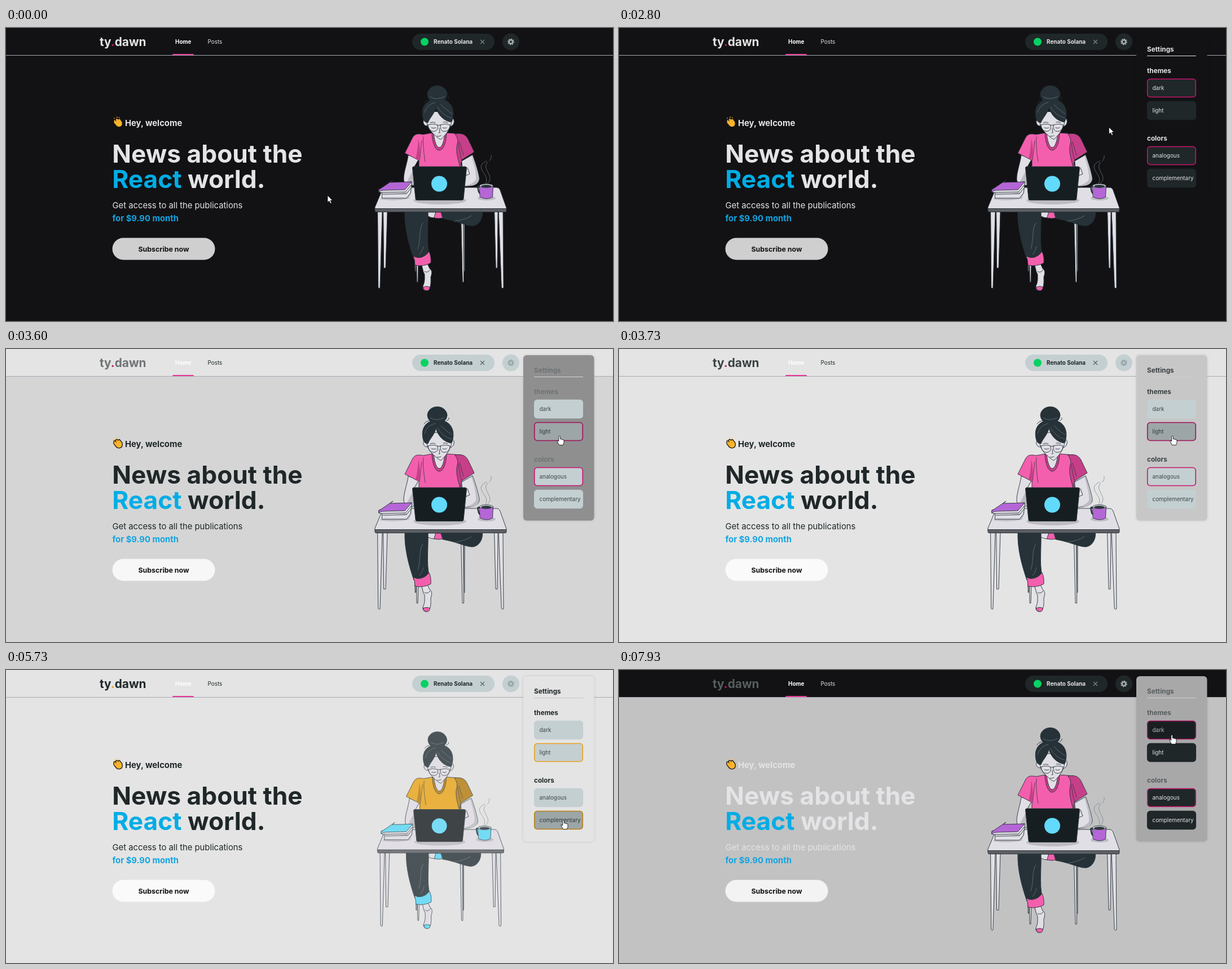
An HTML page for the animation above (8000 ms loop, 1076 px wide and 520 px high).

```html
<!DOCTYPE html>
<html lang="en">
<head>
<meta charset="utf-8">
<title>News</title>
<style>
html, body { margin: 0; width: 100%; height: 100%; overflow: hidden; background: #121214; }
svg { display: block; font-family: Inter, sans-serif;
  --base: #121214; --soft: #1f2729; --text: #e4e4e6; --btnText: #e4e4e4; --icon: #a2a9ab; --cross: #7d8689;
  --accent: #c8146e; --shirt: #f35fad; --shade: #c63f89; --cuff: #f35fad; --item: #b566d6; }
svg.light { --base: #e4e4e4; --soft: #c4cfd1; --text: #1f2729; --btnText: #3d474a; --icon: #97a7aa; --cross: #56656a; }
svg.alt { --accent: #e9a01c; --shirt: #eba519; --shade: #b67c0f; --cuff: #5ad9f9; --item: #5ad9f9; }
.base { fill: var(--base); } .soft { fill: var(--soft); } .text { fill: var(--text); } .ink { fill: var(--ink); }
.b { font-weight: 700; }
.s16 { font-size: 9.92px; } .s19 { font-size: 11.75px; } .s20 { font-size: 12.4px; } .s24 { font-size: 14.8px; } .h1 { font-size: 44.25px; }
.skin { fill: #e1dfe6; } .shirt { fill: var(--shirt); } .shade { fill: var(--shade); } .cuff { fill: var(--cuff); } .item { fill: var(--item); }
.hair { fill: #263238; } .shadow { fill: #bdbbc3; stroke: none; }
.line { fill: none; }
#figure { stroke: #263238; stroke-width: .9; stroke-linejoin: round; stroke-linecap: round; }
.pale { fill: none; stroke: #6f7d84; stroke-width: .7; }
</style>
</head>
<body>
<svg id="stage" width="1076" height="520" viewBox="0 0 1076 520">
  <rect width="1076" height="520" fill="var(--bg)"/>
  <rect class="base" width="1076" height="48"/>
  <rect y="48" width="1076" height="1" fill="#a8a8b3"/>

  <text class="b ink" x="166" y="32" font-size="20.8">ty<tspan fill="var(--accent)">.</tspan>dawn</text>
  <text class="b s16" x="300" y="28" fill="#fff">Home</text>
  <path d="M295 48v-.5q0-1.500 1.500-1.500h35q1.500 0 1.500 1.500v.5z" fill="#e8399a"/>
  <text class="text s16" x="357.500" y="28">Posts</text>

  <rect class="soft" x="720" y="10" width="146" height="29" rx="14.500"/>
  <circle cx="742" cy="24.500" r="7" fill="#04d361"/>
  <text class="text b s16" x="758" y="28.300">Renato Solana</text>
  <path d="M841 21l7 7m0-7l-7 7" stroke="var(--cross)" stroke-width="1.200"/>
  <g id="gear">
    <circle class="soft" cx="895" cy="24.500" r="15"/>
    <g fill="none" stroke="var(--icon)">
      <circle cx="895" cy="24.500" r="3.300" stroke-width="2.800"/>
      <circle cx="895" cy="24.500" r="5.100" stroke-width="1.800" pathLength="16" stroke-dasharray="1"/>
    </g>
  </g>

  <g transform="translate(198 168) scale(1.12) translate(-198 -168.500)" fill="#ffb72b" stroke="#1d1a18" stroke-width="1.200">
    <path d="M192 166q-1-3 2-2l1 1q-1-4 2-3l2 1q1-2 3 0l3 4q1 5-1 7-4 3-8 0l-4-5q-1-2 0-3z"/>
    <path d="M193 169l5 5m-3-7l4 4m-1-7l3 4" stroke="#d98a16" stroke-width=".6"/>
    <path d="M193 162l-1-1m5 0l0-2m3 2l1-1" stroke="#ffb72b"/>
  </g>
  <text class="text b s24" x="211" y="173.500">Hey, welcome</text>
  <text class="text b h1" x="188.200" y="239">News about the</text>
  <text class="text b h1" x="188.200" y="283.600"><tspan fill="#00ade5">React</tspan> world.</text>
  <text class="text s24" x="188.500" y="320">Get access to all the publications</text>
  <text class="b s24" x="188.500" y="342.500" fill="#12a4e1">for $9.90 month</text>
  <rect x="188.500" y="372.500" width="182" height="39" rx="19.500" fill="var(--cta)"/>
  <text class="b s20" x="279.500" y="396.800" text-anchor="middle" fill="#121214">Subscribe now</text>

  <g id="figure">
    <!-- chair and table legs -->
    <g class="skin">
      <path d="M725 410h2l-.5 22h-1zM728 415h3l-1 36h-1.500zM807 340h5l-.5 111h-2zM811 345h2v87h-1z"/>
      <path d="M669 326h7l-3 100h-3zM866 326h6l-1 100h-2.500z"/>
      <path d="M659 326h8l-4 135q-1.500 2-3 0zM873.500 326h7.500l1 135q-2 2-3.500 0z"/>
    </g>
    <!-- legs -->
    <path class="skin" d="M748 327h14l-2 10q-7 0-12-3z"/>
    <path class="cuff" d="M762 327h14l-1 10q-8 2-16 0z"/>
    <path class="hair" d="M771 326h73.500c1 11-5 23-16 25-12 1-26-8-54-13z"/>
    <path class="hair" d="M707 326c-1 28 7 58 16 84l27-8c-5-24-1-50-2-76z"/>
    <path class="pale" d="M739 346c-8 10-3 30-9 46m10-4c-2 7-4 11-7 14M795 343q20-3 30-10"/>
    <path class="skin" d="M737 420l10-2 4 9c5 3 4 9 2 15 0 9 1 18-5 23-5 3-10-1-9-7 4-8 3-14 3-21l-2-4z"/>
    <path class="line" d="M742 432q5 4 10-3"/>
    <path class="cuff" d="M739.500 460q6-3 12 0-1 7-6 6-5 0-6-6z"/>
    <path class="cuff" d="M722 405q15 8 28-8 4 8 3 20-13 7-28 4 0-9-3-16z"/>
    <!-- table -->
    <path class="skin" d="M674 283h195q5 0 7 5l11 31q1 2-2 2H656q-3 0-2-3l13-31q2-4 7-4z"/>
    <path fill="#5d5f64" d="M654 320.500h233v4q0 2-2 2H656q-2 0-2-2z"/>
    <!-- arms -->
    <path class="skin" d="M713 226c-2 15-8 29-8 42 0 8 7 12 18 11V248l9-16z"/>
    <path class="shadow" d="M729 235l-11 24-9 17q6 4 14 2v-30z"/>
    <path class="skin" d="M808 236l19-11c6 16 10 30 12 41 1 9-8 15-27 15z"/>
    <path class="shadow" d="M825 227c5 17 9 30 8 42q-5 8-19 11 24 2 24-12-4-23-12-42z"/>
    <path class="line" d="M815 262l7-3-4-11"/>
    <!-- shirt -->
    <path class="shirt" d="M739 189c-9-2-14-1-18 5l-14 28 25 13v12h76l-4-20 3-39-27-2q-12 5-23 0z"/>
    <path class="shade" d="M796 188c12-2 19 1 23 9l11 23-22 14-3 12q-9-28-5-40 3-8-4-18z"/>
    <path class="shade" stroke="none" d="M732 235q4-18-1-39-1 22-5 36z"/>
    <path class="line" stroke-width=".7" d="M737 200l-4 35m7-42q-2 12 3 44m59-33q2 20 6 30m-4-32l7 24"/>
    <path class="shade" d="M755 187c1 18 6 30 13 30s12-12 13-30z"/>
    <path class="skin" d="M758 184c1 16 5 28 10 28s9-12 10-28z"/>
    <!-- head -->
    <path class="skin" d="M744 160c-5 2-6 9-1 13l4 1m44-14c5 2 4 10 0 13l-3 2"/>
    <path class="skin" d="M745 148c-1 17 1 29 11 38 8 8 14 13 16 11 9-10 19-19 20-47z"/>
    <ellipse class="hair" cx="764.500" cy="117.500" rx="17.500" ry="15"/>
    <path class="hair" d="M739 158c-4-20 8-32 27-32 20 0 30 15 26 34q-1 6-3 7c-12-2-23-11-27-27-1 11-11 19-14 28q-8 0-9-10z"/>
    <path class="line" d="M741 133q4-6 12-6m28 0q5-1 4-5"/>
    <path class="pale" d="M742 150q4-15 19-18m4 8q8 15 25 20m-19-24q13 13 20 16M752 122q10 7 25 0"/>
    <path class="line" d="M748 172q9-3 17 0 2 10-6 11.500-10 0-11-11.500zm22 0q9-3 17 0 0 11-10 11.500-8 0-7-11.500zm-5 1q2-2 5 0m-16 4q4 2 8 0m12 0q4 2 7 0M768 178l1 8h-2m-3 6q4 1 7-1M752 168q5-2 9 0m14-1q4-1 8 1"/>
    <!-- laptop -->
    <ellipse class="shadow" cx="769" cy="306" rx="47" ry="7"/>
    <path fill="#171e21" d="M723 246h91q2.500 0 2.500 2.500L811 303q0 2.500-3 2.500h-79q-3 0-3-2.500l-5.500-55q0-2 2.500-2z"/>
    <circle cx="768" cy="276.500" r="14" fill="#61dafb" stroke="none"/>
    <!-- books -->
    <path class="shadow" d="M663 304l6-6 50-8-5 13q-25 5-51 1z"/>
    <path class="skin" d="M667 289l15-10 37 1-2 13-7 9h-43zM668 295l42-1 8-10"/>
    <path class="skin" d="M661 286q-2 5 3 6l44-1 11-13v-5z"/>
    <path class="item" d="M661 287l25-17-5 4 38-1-12 14-38 1q-5 0-8 3z"/>
    <!-- mug and steam -->
    <ellipse class="shadow" cx="852" cy="302" rx="16" ry="4"/>
    <path class="line" d="M840 282q-5-3-3 4 1 8 5 8" stroke-width="2.500"/>
    <path class="item" d="M839.500 280h24l-1 20q-10 6-22 0z"/>
    <ellipse class="skin" cx="851.500" cy="280" rx="12" ry="3.500"/>
    <ellipse class="hair" cx="851.500" cy="280.700" rx="9" ry="2"/>
    <path class="pale" d="M850 276c8-14-12-22-7-33q3-5 9-7m1 40c16-13-12-26 1-38m3-2q4-4 3-10"/>
  </g>

  <g id="panel">
    <rect x="917" y="11" width="125.500" height="293.500" rx="6" fill="var(--panel)" style="filter:drop-shadow(0 0 2px #0002)"/>
    <g class="ink b s19">
      <text x="936" y="42">Settings</text>
      <text x="936" y="80">themes</text>
      <text x="936" y="200">colors</text>
    </g>
    <rect x="936" y="49" width="87" height="1" fill="var(--rule)"/>
  </g>

  <path id="arrow" d="M0 0v12.500l2.900-2.600 2.100 4.600 2.200-1-2.100-4.400H9z" fill="#fff" stroke="#000" stroke-width=".8"/>
  <path id="hand" d="M-1.300 1Q0-1 1.300 1V6q1.500-1 2.500.5 1.500-.8 2.200.5 2-.5 2 1.500v4l-1.500 4h-7L-4 10q-.5-2 1-1.500L-1.300 10z" fill="#fff" stroke="#000" stroke-width=".8"/>
</svg>
<script>
const LOOP = 8000, TO_LIGHT = 3400, TO_DARK = 7870, SWAPS = [5450, 6706], POP = 350;
const $ = id => document.getElementById(id);
const stage = $('stage');
const clamp = v => Math.min(1, Math.max(0, v));
const smooth = p => p * p * (3 - 2 * p);

// Cursor tip: time, x, y
const path = [
  [0, 570, 297], [60, 570, 297], [190, 690, 236], [330, 799, 173], [430, 800, 172],
  [800, 868, 96], [1000, 889, 50], [1200, 896, 38], [2370, 896, 38], [2530, 862, 82],
  [2680, 847, 140], [2800, 868, 176], [2940, 940, 168], [3070, 981, 154], [4370, 981, 154],
  [4600, 985, 112], [4720, 986, 118], [4950, 988, 220], [5130, 988, 266], [5970, 988, 266],
  [6130, 988, 236], [7130, 988, 236], [7330, 985, 163], [7380, 985, 163], [7600, 980, 115]
];
// Slower fade of panel and logo: elapsed time, share
const fade = [[0, 0], [60, .28], [70, .33], [330, .86], [470, 1]];

function at(keys, t) {
  const i = keys.findIndex(k => k[0] > t);
  if (i < 0) return keys[keys.length - 1].slice(1);
  if (!i) return keys[0].slice(1);
  const a = keys[i - 1], b = keys[i], p = (t - a[0]) / (b[0] - a[0]);
  return a.slice(1).map((v, n) => v + (b[n + 1] - v) * p);
}

function mix(a, b, p) {
  return `rgb(${a.map((v, i) => Math.round(v + (b[i] - v) * p))})`;
}
const DARK = [18, 18, 20], PALE = [228, 228, 228], INK = [31, 39, 41];

const options = [['dark', 90], ['light', 130], ['analogous', 210], ['complementary', 250]].map(([name, y]) => {
  $('panel').insertAdjacentHTML('beforeend', `<g>
    <rect class="soft" x="936.75" y="${y + .5}" width="85.5" height="32" rx="5" stroke-width="1.6"/>
    <text class="s16" x="945.5" y="${y + 20}" fill="var(--btnText)">${name}</text></g>`);
  return { name, y, node: $('panel').lastElementChild };
});

function dim(node, on) {
  node.style.filter = on ? 'brightness(.8)' : 'none';
}

function draw(t) {
  const light = t >= TO_LIGHT && t < TO_DARK;
  const alt = t >= SWAPS[0] && t < SWAPS[1];
  const since = t - (t >= TO_DARK ? TO_DARK : TO_LIGHT);
  const share = p => t >= TO_DARK ? 1 - p : p;
  const quick = share(smooth(clamp(since / 240)));
  const slow = share(at(fade, since)[0]);

  stage.setAttribute('class', (light ? 'light ' : '') + (alt ? 'alt' : ''));
  const vars = {
    bg: mix(DARK, PALE, quick),
    cta: mix([207, 207, 207], [250, 250, 250], quick),
    panel: mix(DARK, PALE, slow),
    ink: mix(PALE, INK, slow),
    rule: mix(PALE, [197, 199, 201], slow)
  };
  for (const k in vars) stage.style.setProperty('--' + k, vars[k]);

  const swap = SWAPS.filter(s => s <= t).pop() ?? -POP;
  const pop = clamp((t - swap) / POP), scale = .8 + .2 * pop;
  $('figure').setAttribute('opacity', pop);
  $('figure').setAttribute('transform', `translate(770.5 284) scale(${scale}) translate(-770.5 -284)`);
  $('panel').setAttribute('opacity', clamp((t - 1430) / 470));

  const [x, y] = at(path, t);
  let hand = false;
  const chosen = [light ? 'light' : 'dark', alt ? 'complementary' : 'analogous'];
  for (const o of options) {
    const over = x > 936 && x < 1023 && y > o.y && y < o.y + 33;
    hand ||= over;
    dim(o.node, over);
    o.node.firstElementChild.setAttribute('stroke', chosen.includes(o.name) ? 'var(--accent)' : 'var(--soft)');
  }
  dim($('gear'), t < 1500 && Math.hypot(x - 895, y - 24.5) < 15);
  for (const id of ['arrow', 'hand']) {
    $(id).setAttribute('transform', `translate(${x} ${y})`);
    $(id).setAttribute('visibility', (id === 'hand') === hand ? 'visible' : 'hidden');
  }
}

const start = performance.now();
function tick() {
  draw((performance.now() - start) % LOOP);
  requestAnimationFrame(tick);
}
draw(0);
requestAnimationFrame(tick);
</script>
</body>
</html>
```
